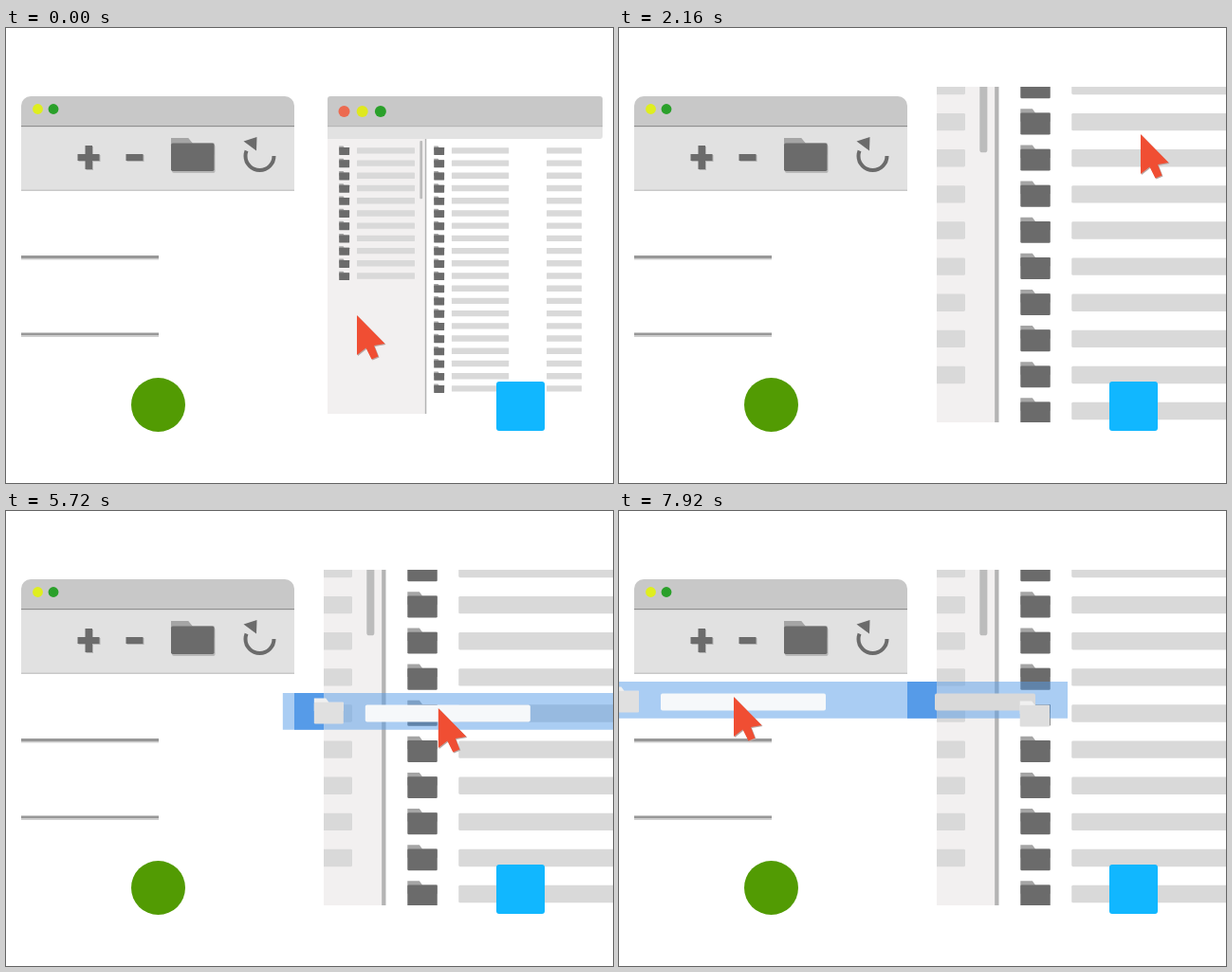
Animation, 640 px wide and 480 px high, one loop 8000 ms. Source, as an HTML page with a canvas:

```html
<!DOCTYPE html>
<html lang="en">
<head>
<meta charset="utf-8">
<title>Drag a folder</title>
<style>
html, body { margin: 0; width: 100%; height: 100%; overflow: hidden; background: #fff; }
canvas { display: block; }
</style>
</head>
<body>
<canvas id="stage" width="640" height="480"></canvas>
<script>
const ctx = document.getElementById('stage').getContext('2d');
const LOOP = 8000, GRAB = 4920, DROP_FADE = 7050;
const GREY = '#6b6b6b', BAR = '#d9d9d9', BLUE = '#569be8';

// Smooth monotone curve through [time, value] points, at rest at both ends.
function track(keys) {
  const rate = i => (keys[i + 1][1] - keys[i][1]) / (keys[i + 1][0] - keys[i][0]);
  const slope = keys.map((key, i) => {
    if (i === 0 || i === keys.length - 1) return 0;
    const a = rate(i - 1), b = rate(i);
    if (a * b <= 0) return 0;
    const mean = (keys[i + 1][1] - keys[i - 1][1]) / (keys[i + 1][0] - keys[i - 1][0]);
    return Math.sign(mean) * Math.min(Math.abs(mean), 3 * Math.abs(a), 3 * Math.abs(b));
  });
  return t => {
    if (t <= keys[0][0]) return keys[0][1];
    const i = keys.findIndex(key => key[0] > t) - 1;
    if (i < 0) return keys[keys.length - 1][1];
    const [t0, v0] = keys[i], [t1, v1] = keys[i + 1];
    const span = t1 - t0, u = (t - t0) / span, w = 1 - u;
    return v0 * (1 + 2 * u) * w * w + v1 * u * u * (3 - 2 * u)
      + span * u * w * (slope[i] * w - slope[i + 1] * u);
  };
}

const zoomAt = track([[0, 1], [1160, 2.237], [1960, 2.886]]);
const cursorX = track([[0, 370], [1160, 516], [2160, 550], [4280, 550], [4760, 554],
  [GRAB, 554], [5720, 456], [7000, 195], [7920, 121]]);
const cursorY = track([[0, 303], [1160, 113], [2160, 112], [4280, 190], [4760, 209],
  [GRAB, 209], [5720, 208], [7000, 198], [7920, 196]]);

function rect(x, y, w, h, color, radius = 0) {
  ctx.fillStyle = color;
  ctx.beginPath();
  ctx.roundRect(x, y, w, h, radius);
  ctx.fill();
}

function dot(x, y, r, color) {
  ctx.fillStyle = color;
  ctx.beginPath();
  ctx.arc(x, y, r, 0, 7);
  ctx.fill();
}

function polygon(points, color) {
  ctx.fillStyle = color;
  ctx.beginPath();
  points.forEach(([x, y]) => ctx.lineTo(x, y));
  ctx.closePath();
  ctx.fill();
}

function folder(x, y, w, h, body, tab) {
  const lip = h * 0.16;
  polygon([[x, y + h / 2], [x, y], [x + w * 0.4, y], [x + w * 0.5, y + lip],
    [x + w, y + lip], [x + w, y + h / 2]], tab);
  rect(x, y + lip, w, h - lip, body, w * 0.04);
}

function leftWindow() {
  rect(16, 72, 288, 32, '#c8c8c8', [10, 10, 0, 0]);
  rect(16, 103, 288, 1.5, '#8f8f8f');
  rect(16, 104.5, 288, 66.5, '#e1e1e1');
  rect(16, 170.5, 288, 1.5, '#c9c9c9');
  dot(33.5, 85.5, 5.4, '#dfee1f');
  dot(50, 85.5, 5.4, '#2aa02a');

  for (const [shift, color] of [[1, '#b5b5b5'], [0, GREY]]) {
    rect(75.5 + shift, 133 + shift, 23, 7, color);
    rect(83.5 + shift, 124 + shift, 7.5, 25, color);
    rect(126.5 + shift, 133 + shift, 18, 7, color);
  }
  rect(175, 123, 45.5, 30, '#b8b8b8', 2);
  folder(174, 116, 45.5, 35, GREY, '#a5a5a5');

  ctx.strokeStyle = GREY;
  ctx.lineWidth = 4;
  ctx.beginPath();
  ctx.arc(267.5, 135, 15, 0, Math.PI * 1.12);
  ctx.stroke();
  polygon([[250.5, 119.5], [264.5, 115], [264, 129.5]], GREY);

  for (const y of [240, 321.5]) {
    rect(16, y, 145, 3, '#989898');
    rect(16, y + 3, 145, 1.5, '#cfcfcf');
  }
}

function listRow(x, y) {
  folder(x, y - 4.8, 10.9, 9.4, GREY, '#a5a5a5');
}

function rightWindow(zoom) {
  ctx.save();
  ctx.beginPath();
  ctx.rect(335, 62, 305, 354);
  ctx.clip();
  ctx.translate(466, 206.1);
  ctx.scale(zoom, zoom);
  ctx.translate(-466, -206.1);

  rect(339, 72, 290, 32, '#c8c8c8', [3, 3, 0, 0]);
  rect(339, 103.5, 290, 1, '#a8a8a8');
  rect(339, 104.5, 290, 12.5, '#e2e2e2', [0, 0, 3, 0]);
  ['#ec6a50', '#dfe81f', '#2aa02a'].forEach((color, i) => dot(356.5 + i * 19.2, 88, 6, color));

  rect(339, 117, 103, 290, '#f2f0f0');
  rect(441.8, 117, 1.5, 290, '#b4b4b4');
  rect(436.3, 119, 2.8, 61.2, '#bcbcbc', 1);

  for (let i = 0; i < 20; i++) {
    const y = 129.4 + i * 13.21;
    if (i < 11) {
      listRow(351.2, y);
      rect(370, y - 3.2, 61, 6.4, BAR, 0.5);
    }
    listRow(451.2, y);
    rect(469.9, y - 3.2, 60.3, 6.4, BAR, 0.5);
    rect(570, y - 3.2, 37, 6.4, BAR, 0.5);
  }
  ctx.restore();
}

function draggedRow(x, y, fade) {
  const left = x - 164, right = x + 352, top = y - 16;
  ctx.globalAlpha = 0.5;
  rect(left, top, right - left, 38.7, BLUE);
  ctx.globalAlpha = 1;
  const gapLeft = Math.max(left, 304), gapRight = Math.min(right, 335);
  if (gapRight > gapLeft) rect(gapLeft, top, gapRight - gapLeft, 38.7, BLUE);

  const shade = Math.round(243 - 26 * fade);
  folder(x - 131, y - 10.5, 31, 27, '#e0e0e0', '#f0f0f0');
  rect(x - 77, y - 3.5, 174, 18, '#f6f8fa', 2);
  rect(x + 212, y - 3.5, 106, 18, `rgb(${shade},${shade},${shade})`, 2);

  ctx.globalAlpha = fade;
  folder(422.7, 200.5, 31.3, 27, '#dedede', '#f0f0f0');
  ctx.globalAlpha = 1;
}

function cursor(x, y) {
  const arrow = [[0, 0], [0, 42], [9.5, 34.5], [15.5, 46.5], [22.5, 43.5], [18, 32], [29.5, 30]];
  for (const [shift, color] of [[1, '#b9a6a2'], [0, '#f04e33']])
    polygon(arrow.map(([dx, dy]) => [x + dx + shift, y + dy + shift]), color);
}

function draw(t) {
  ctx.fillStyle = '#fff';
  ctx.fillRect(0, 0, 640, 480);
  const x = cursorX(t), y = cursorY(t);
  leftWindow();
  rightWindow(zoomAt(t));
  if (t >= GRAB + 40) draggedRow(x, y, Math.min(1, Math.max(0, (t - DROP_FADE) / 800)));
  dot(160.5, 397.5, 28.5, '#529b03');
  rect(517, 373, 51, 52, '#11b7ff', 3);
  cursor(x, y);
}

const start = performance.now();
function tick() {
  draw((performance.now() - start) % LOOP);
  requestAnimationFrame(tick);
}
tick();
</script>
</body>
</html>
```
